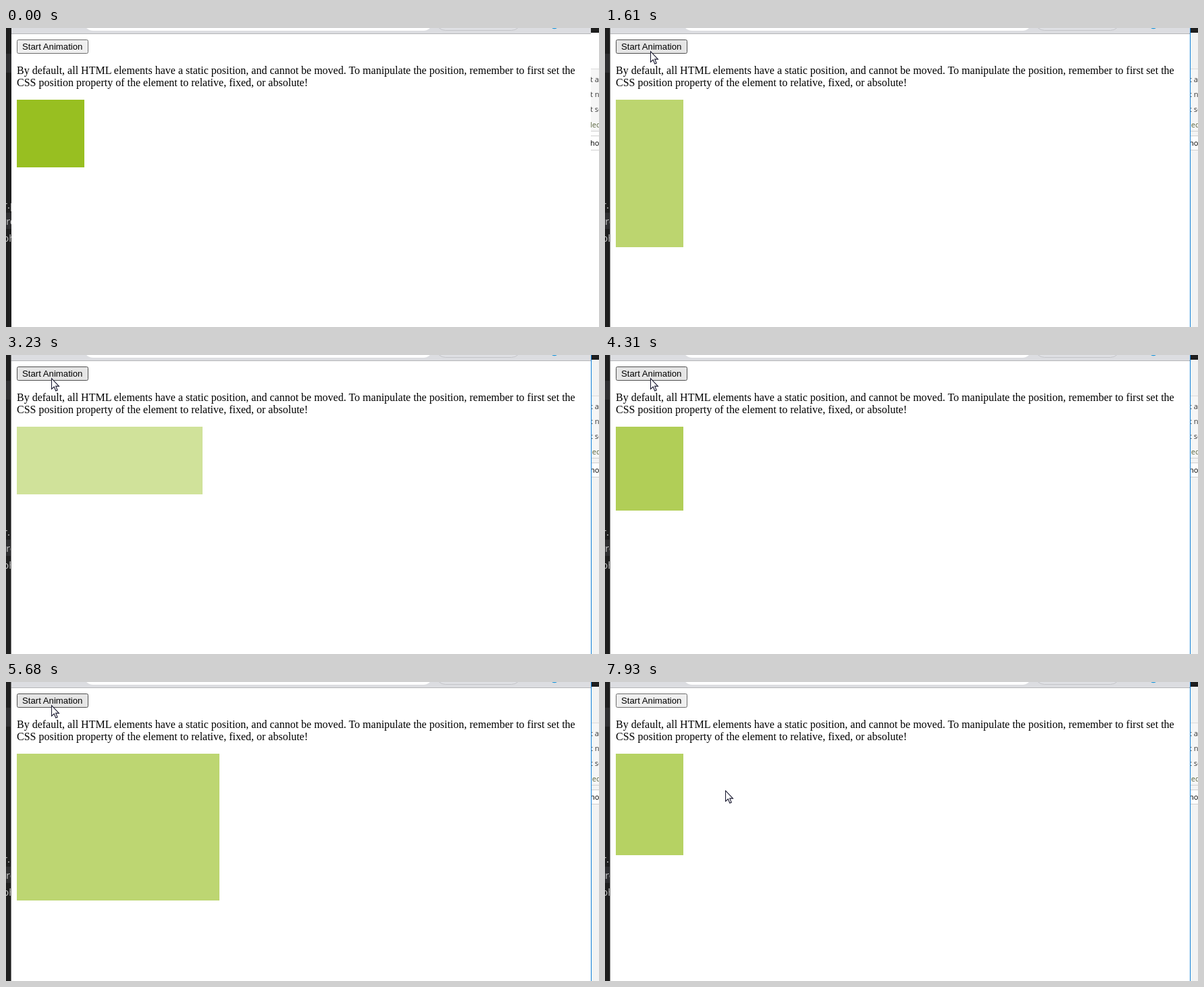
Animation of 878 by 442 pixels, one loop 8000 ms. Source, as an HTML page:

```html
<!DOCTYPE html>
<html lang="en">
<head>
<meta charset="utf-8">
<title>Animated box</title>
<style>
  html, body { margin: 0; width: 878px; height: 442px; overflow: hidden; background: #fff; }
  #stage { position: relative; width: 878px; height: 442px; overflow: hidden; }
  #stage > * { position: absolute; }
  svg { left: 0; top: 0; }

  .strip { top: 0; height: 442px; overflow: hidden; white-space: pre; }
  .strip span { position: absolute; }
  .strip i { position: absolute; left: 0; width: 100%; }
  #editor { left: 0; width: 8px; background: #1e1e1e; color: #c4c4c4; font: 15px/20px "Open Sans", sans-serif; }
  #editor i { background: #2e2e30; }
  #notes { left: 866px; width: 12px; background: #fff; color: #333; font: 11px/16px "Open Sans", sans-serif; border-left: 0; }
  #edge { left: 866px; top: 0; width: 1px; height: 442px; background: #a5a5a5; }
  #leftEdge { left: 7px; top: 0; width: 1px; height: 442px; background: #777; visibility: hidden; }

  .focused #notes { background: #f3f3f3; }
  .focused #edge { background: #0f7fd8; z-index: 2; }
  .focused #leftEdge { visibility: visible; }

  #button {
    left: 16px; top: 17px; width: 106px; height: 21px; box-sizing: border-box;
    border: 1px solid #6c6c6c; border-radius: 2.5px; background: #efefef;
    font: 13.2px/19px "Liberation Sans", Arial, sans-serif; color: #000;
    padding-left: 7px; white-space: nowrap;
  }
  #button.hover { background: #e5e5e5; border-color: #4f4f4f; }
  #button.pressed { background: #f5f5f5; border-color: #8d8d8d; }

  p {
    left: 16px; top: 54px; margin: 0; white-space: nowrap; color: #000;
    font: 16px/18px "Liberation Serif", "Times New Roman", serif;
  }
  #box { left: 16px; top: 106px; width: 100px; height: 100px; background: #98bf21; }
  #cursor { z-index: 3; }
</style>
</head>
<body>
<div id="stage">
  <svg width="878" height="10">
    <rect x="8" width="858" height="8" fill="#dcdde1"/>
    <rect x="8" y="8" width="858" height="1" fill="#b4b5b8"/>
    <rect x="115" y="-24" width="517" height="28" rx="14" fill="#fff"/>
    <rect x="636.5" y="-24.5" width="126" height="28" rx="14" fill="#dfe0e4" stroke="#c3c4c8"/>
    <circle cx="812" cy="-5" r="6.3" fill="#1b98dc"/>
  </svg>

  <div id="editor" class="strip">
    <i style="top:38px;height:28px"></i>
    <i style="top:273px;height:24px"></i>
    <span style="left:-4px;top:251px">r.php</span>
    <span style="left:0;top:275px">re</span>
    <span style="left:-5px;top:300px">php</span>
  </div>
  <div id="leftEdge"></div>

  <div id="edge"></div>
  <div id="notes" class="strip" style="background-clip:padding-box">
    <i style="top:0;height:7px;background:#1e1e1e"></i>
    <i style="top:60px;height:1px;background:#dcdcdc"></i>
    <i style="top:61px;height:91px;background:#f6f6f6"></i>
    <i style="top:152px;height:1px;background:#cfcfcf"></i>
    <i style="top:159px;height:20px;background:#fff;border:solid #cfcfcf;border-width:1px 0"></i>
    <span style="left:-1px;top:68px">t a</span>
    <span style="left:-1px;top:90px">t n</span>
    <span style="left:-1px;top:112px">t se</span>
    <span style="left:-1px;top:135px;color:#5a6640">led</span>
    <span style="left:-1px;top:162px;color:#000">ho</span>
  </div>

  <div id="button">Start Animation</div>
  <p>By default, all HTML elements have a static position, and cannot be moved. To manipulate the position, remember to first set the<br>CSS position property of the element to relative, fixed, or absolute!</p>
  <div id="box"></div>

  <svg id="cursor" width="14" height="22">
    <path d="M.5 .7V16.4L4.2 13 6.8 19 9.2 18 6.7 12.1H11.4Z" fill="#fff" stroke="#17172e" stroke-width="1.1"/>
  </svg>
</div>

<script>
const LOOP = 8000;
const STAGE = 600;
const el = id => document.getElementById(id);
const stage = el('stage'), box = el('box'), button = el('button'), cursor = el('cursor');

const syncs = [0, 130, 590, 1330, 1610, 2280, 3230, 4310, 5680, 6450, 7930, LOOP];

// Each run: start, time between stage starts, opacity before it.
const runs = [[1275, 606, 1], [4175, 619, 0.8], [7730, 606, 0.8]];
const presses = [[1125, 1270], [4030, 4170], [7320, 7655]];
const path = [
  [125, 694, 393], [200, 340, 190], [268, 53, 41], [525, 53, 41], [860, 67, 34],
  [6640, 67, 34], [6900, 64, 33], [7270, 67, 34], [7735, 67, 34], [7930, 178, 160], [LOOP, 178, 160]
];

function heldTime(t) {
  let i = syncs.length - 2;
  while (syncs[i] > t) i--;
  const span = syncs[i + 1] - syncs[i];
  const step = span / Math.round(span / 67.3);
  return syncs[i] + Math.floor((t - syncs[i]) / step + 1e-6) * step;
}

const mix = (a, b, k) => a + (b - a) * k;
const swing = p => 0.5 - Math.cos(Math.PI * p) / 2;

function boxAt(t) {
  const run = runs.filter(r => t >= r[0]).pop();
  if (!run) return { w: 100, h: 100, o: 1 };
  const [start, gap, before] = run;
  const k = [0, 1, 2, 3].map(n =>
    swing(Math.min(1, Math.max(0, (t - start - n * gap) / STAGE))));
  let o = before;
  [0.4, 0.8, 0.4, 0.8].forEach((goal, n) => { o = mix(o, goal, k[n]); });
  return { w: 100 + 200 * (k[1] - k[3]), h: 100 + 200 * (k[0] - k[2]), o };
}

function cursorAt(t) {
  const i = path.findIndex(p => p[0] > t);
  if (i < 1) return null;
  const [a, b] = [path[i - 1], path[i]];
  const k = (t - a[0]) / (b[0] - a[0]);
  return { x: Math.round(mix(a[1], b[1], k)), y: Math.round(mix(a[2], b[2], k)) };
}

function draw() {
  const t = heldTime(performance.now() % LOOP);

  const { w, h, o } = boxAt(t);
  box.style.width = Math.round(w) + 'px';
  box.style.height = Math.round(h) + 'px';
  box.style.opacity = o;

  const c = cursorAt(t);
  cursor.style.visibility = c ? 'visible' : 'hidden';
  if (c) cursor.style.transform = `translate(${c.x}px, ${c.y}px)`;

  const hover = c && c.x >= 16 && c.x < 122 && c.y >= 17 && c.y < 38;
  button.classList.toggle('hover', !!hover);
  button.classList.toggle('pressed', presses.some(([a, b]) => t >= a && t < b));
  stage.classList.toggle('focused', t >= presses[0][0]);

  requestAnimationFrame(draw);
}
draw();
</script>
</body>
</html>
```
